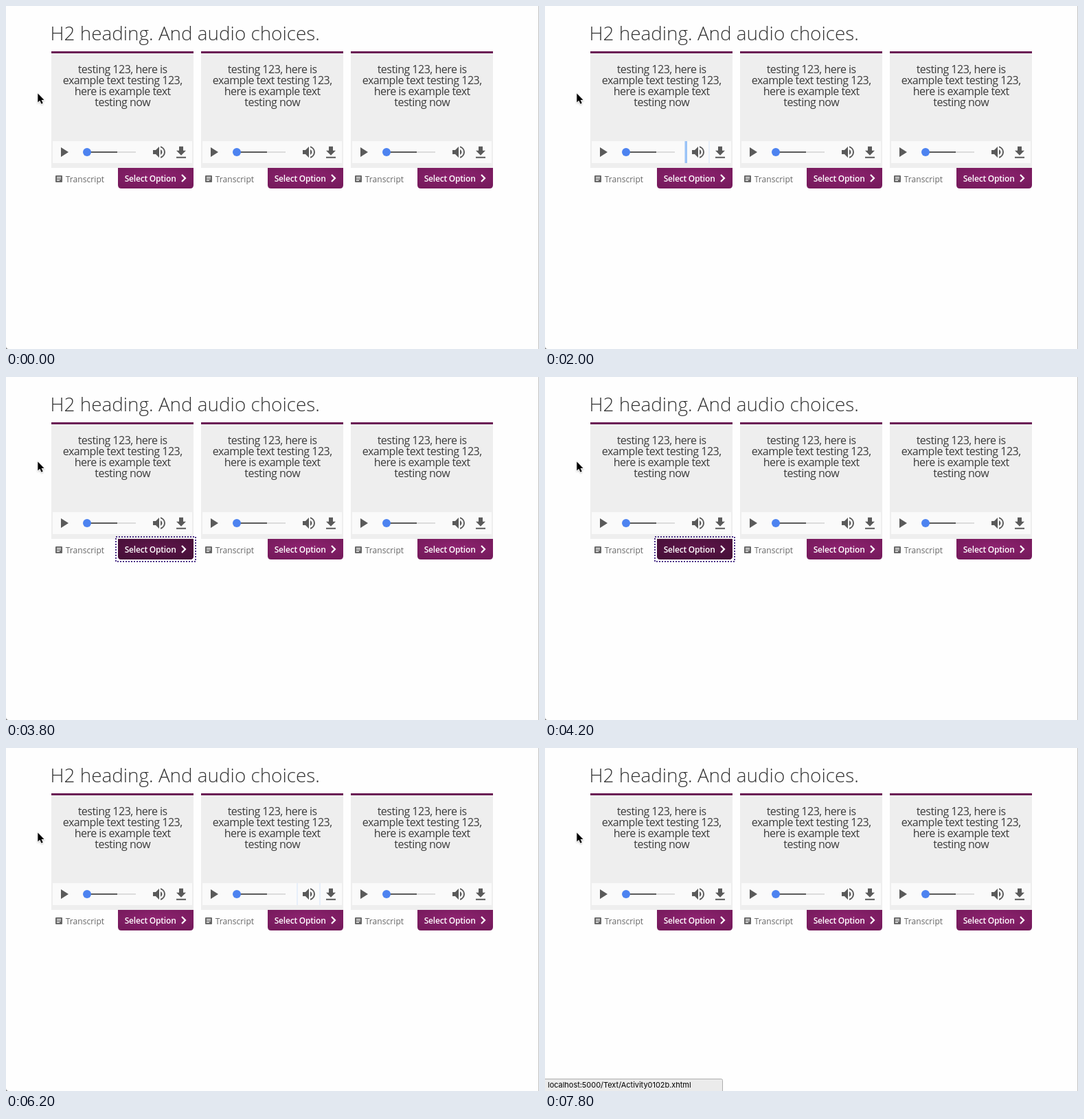
An HTML page that plays this animation: 776x500 px, repeating every 8000 ms.

```html
<!DOCTYPE html>
<html lang="en">
<head>
<meta charset="utf-8">
<title>Audio choices</title>
<style>
  html, body { margin: 0; width: 100%; height: 100%; overflow: hidden; background: #fefefe; }
  svg { display: block; }
  text { font-family: "Open Sans", "Noto Sans", sans-serif; }
  .heading { font-size: 27.85px; font-weight: 300; fill: #333; }
  .blurb { font-size: 16px; letter-spacing: -.5px; text-anchor: middle; fill: #3c3c3c; }
  .label { font-size: 12px; font-weight: 500; letter-spacing: .08px; }
  .select { font-weight: 600; letter-spacing: -.2px; fill: #fff; }
  .url { font: 11px Inter, Roboto, sans-serif; letter-spacing: -.03px; fill: #000; }
  .transcript { fill: #666; }
  .fill { transform-box: fill-box; transform-origin: top; }
  .glow { fill: none; stroke: #9ac3f7; stroke-width: 2; }
  .dots { fill: none; stroke: #4c3288; stroke-width: 2; stroke-dasharray: 2 2; }
  .hidden { opacity: 0; }
</style>
</head>
<body>
<svg id="stage" width="776" height="500" viewBox="0 0 776 500">
  <defs>
    <radialGradient id="plum" cx=".5" cy=".4" r=".65">
      <stop offset="0" stop-color="#8e2370"/><stop offset="1" stop-color="#761a5c"/>
    </radialGradient>
    <radialGradient id="plumDark" cx=".5" cy=".4" r=".65">
      <stop offset="0" stop-color="#5f164b"/><stop offset="1" stop-color="#470f38"/>
    </radialGradient>
    <radialGradient id="violet" cx=".5" cy=".4" r=".65">
      <stop offset="0" stop-color="#523f92"/><stop offset="1" stop-color="#43317b"/>
    </radialGradient>
    <filter id="shadow" x="-50%" y="-50%" width="200%" height="200%">
      <feDropShadow dx="0" dy="1" stdDeviation="1" flood-opacity=".3"/>
    </filter>
  </defs>
  <rect width="776" height="500" fill="#fefefe"/>
  <text class="heading" x="64.6" y="50">H2 heading. And audio choices.</text>
  <g id="cards"></g>
  <path d="M775.5 0V500" stroke="#c4c4c4"/>
  <path d="M0 496Q0 500 4 500H0Z" fill="#777"/>
  <g id="statuses"></g>
  <g id="cursor">
    <path transform="translate(46.3 127.4) scale(.9)" d="M0 0v14.5l3.3-3 2.4 5.5 2.5-1.1-2.4-5.3h4.4z"
      stroke="#fff" stroke-width="1.4" paint-order="stroke" filter="url(#shadow)"/>
  </g>
</svg>
<script>
  const LOOP = 8000;
  const CARD_PITCH = 218;
  const blurb = ["testing 123, here is", "example text testing 123,", "here is example text", "testing now"];
  const byId = id => document.getElementById(id);

  // Focusable media controls: left edge and width
  const controls = { play: [68, 31], slider: [101, 103], volume: [206, 33], download: [240, 31] };

  const buttonPath = "M163 236h110v25q0 5-5 5h-100q-5 0-5-5z";

  function card(n) {
    const lines = blurb.map((line, i) => `<text class="blurb" x="169.7" y="${98 + i * 16}">${line}</text>`).join("");
    const glows = Object.entries(controls).map(([name, [x, w]]) => {
      const shape = name === "volume"
        ? `<path class="glow" d="M${x} 197v32m${w} 0v-32"/>`
        : `<rect class="glow" x="${x}" y="198" width="${w}" height="30"/>`;
      return `<g class="hidden" id="${name}${n}">${shape}</g>`;
    }).join("");

    return `<g transform="translate(${n * CARD_PITCH})">
      <rect x="66" y="66" width="207" height="170" fill="#eee"/>
      <rect x="66" y="66" width="207" height="3" fill="#6a1c54"/>
      ${lines}
      <rect x="68" y="197" width="203" height="32" fill="#fafafa"/>
      <g fill="#5a5a5a">
        <path transform="translate(72 201)" d="M8 5v14l11-7z"/>
        <path transform="translate(211 201)" d="M3 9v6h4l5 5V4L7 9zM16.5 12A4.5 4.5 0 0 0 14 7.97v8.05A4.47 4.47 0 0 0 16.5 12zM14 3.23v2.06a7 7 0 0 1 0 13.42v2.06a9 9 0 0 0 0-17.54z"/>
        <path transform="translate(243 201.7)" d="M19 9h-4V3H9v6H5l7 7zM5 18v2h14v-2z"/>
        <rect x="118" y="212" width="44" height="2"/>
      </g>
      <rect x="162" y="212" width="27" height="2" fill="#dcdcdc"/>
      <circle cx="118" cy="213" r="6" fill="#4d83f0"/>
      ${glows}
      <path d="${buttonPath}" fill="url(#plum)"/>
      <g class="hidden" id="transcriptFocus${n}">
        <rect class="fill" id="transcriptFill${n}" x="66" y="236" width="96" height="30" fill="url(#violet)"/>
        <rect class="dots" x="63" y="233" width="102" height="36"/>
      </g>
      <g class="transcript" id="transcript${n}">
        <path fill-rule="evenodd" d="M73 247h8q1 0 1 1v8q0 1-1 1h-8q-1 0-1-1v-8q0-1 1-1zM74 249v1.2h6v-1.2zM74 251.4v1.2h6v-1.2zM74 253.8v1.2h4v-1.2z"/>
        <text class="label" x="86.7" y="257">Transcript</text>
      </g>
      <g class="hidden" id="select${n}">
        <path d="${buttonPath}" fill="url(#plumDark)"/>
        <rect class="dots" x="160" y="233" width="116" height="36"/>
      </g>
      <text class="label select" x="172.7" y="256">Select Option</text>
      <path d="M256 246l5 5-5 5" fill="none" stroke="#fff" stroke-width="2.2"/>
    </g>`;
  }

  const status = (n, letter) => `<g class="hidden" id="status${n}">
    <path d="M-1 482.5H256.5q2 0 2 2V501H-1z" fill="#ebebeb" stroke="#adadad"/>
    <text class="url" x="4" y="495">localhost:5000/Text/Activity0102${letter}.xhtml</text></g>`;

  byId("cards").innerHTML = [0, 1, 2].map(card).join("");
  byId("statuses").innerHTML = status(0, "a") + status(1, "b");

  const sheet = document.head.appendChild(document.createElement("style"));

  // Holds each [time, declaration] until the next one
  function track(id, rest, ...steps) {
    const frames = [[0, rest], ...steps, [LOOP, rest]]
      .map(([time, css]) => `${time / LOOP * 100}% { ${css} }`).join(" ");
    sheet.textContent += `@keyframes ${id} { ${frames} }
      #${id} { animation: ${id} ${LOOP}ms step-end -20ms infinite; }\n`;
  }

  const alpha = value => `opacity: ${value}`;
  const show = (id, from, to) => track(id, alpha(0), [from, alpha(1)], [to, alpha(0)]);
  const glow = (id, from, to) =>
    track(id, alpha(0), [from, alpha(.2)], [from + 200, alpha(1)], [to, alpha(0)]);

  function transcript(n, from, to) {
    show(`transcriptFocus${n}`, from, to);
    track(`transcriptFill${n}`, "transform: scaleY(.07)",
      [from + 200, "transform: none"], [to, "transform: scaleY(.07)"]);
    track(`transcript${n}`, "fill: #666",
      [from, "fill: #4f3a8c"], [from + 200, "fill: #fff"], [to, "fill: #666"]);
  }

  glow("play0", 400, 1000);
  glow("slider0", 1000, 2000);
  // The slider's right edge lingers beside the volume button
  byId("cards").insertAdjacentHTML("beforeend",
    '<rect class="hidden" id="edge" x="203.5" y="197" width="3.5" height="32" fill="#9ac3f7"/>');
  show("edge", 2000, 2200);
  glow("volume0", 2000, 2600);
  glow("download0", 2600, 3000);
  transcript(0, 3000, 3800);
  show("select0", 3800, 5200);
  track("status0", alpha(0), [4400, alpha(1)], [5200, alpha(.6)], [5400, alpha(.04)], [5600, alpha(0)]);

  glow("play1", 5400, 5800);
  glow("slider1", 5800, 6200);
  glow("volume1", 6200, 6600);
  glow("download1", 6600, 7000);
  transcript(1, 7000, 7400);
  show("select1", 7400, 7800);
  show("status1", 7600, LOOP - 1);

  track("cursor", "transform: none", [2800, "transform: translateY(-4px)"]);
</script>
</body>
</html>
```
